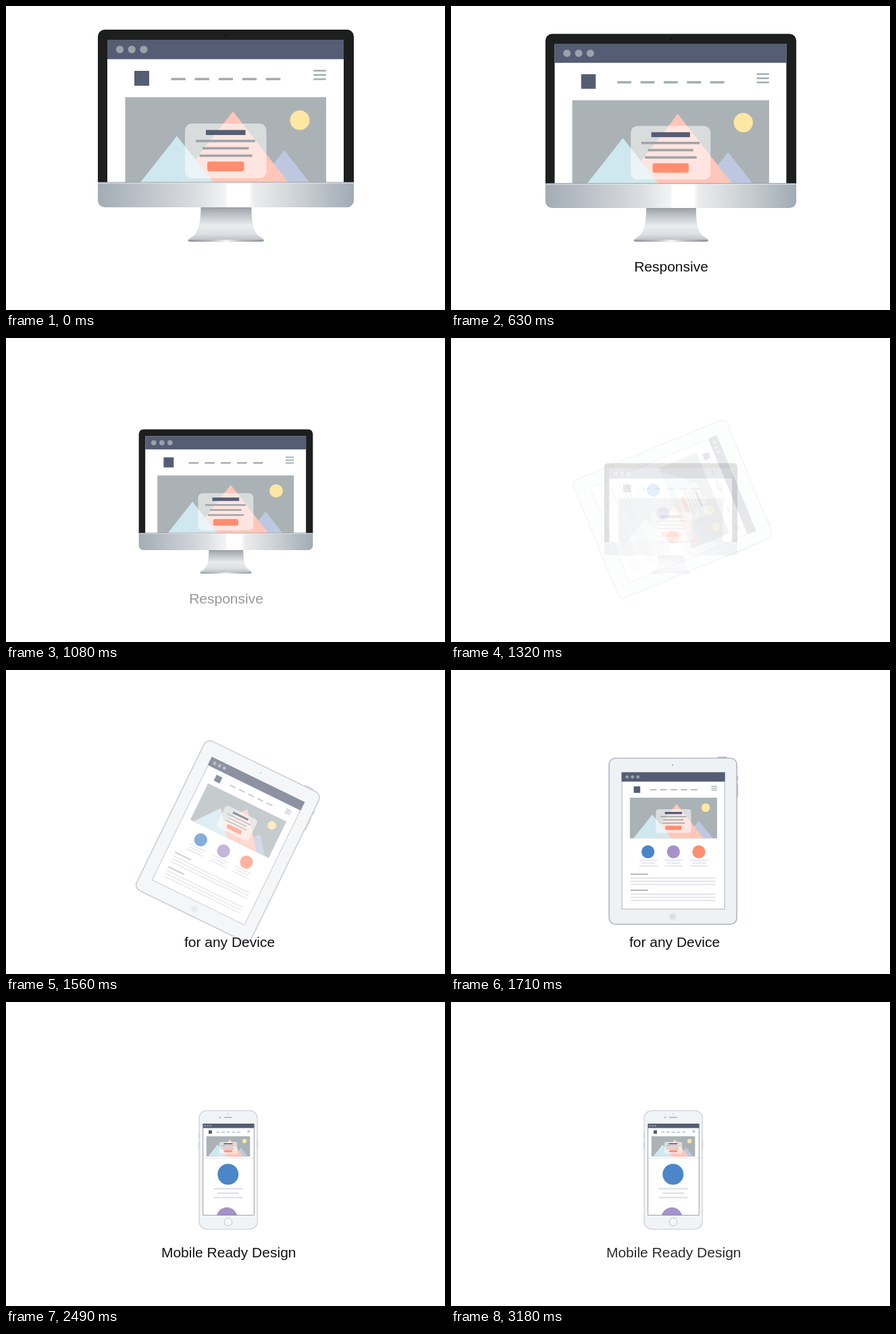
These frames come from a looping animation (650x450 px, 9.18 s). An HTML page:

```html
<!DOCTYPE html>
<html lang="en">
<head>
<meta charset="utf-8">
<title>Responsive design</title>
<style>
  html, body { margin: 0; width: 100%; height: 100%; overflow: hidden; background: #fff; }
  svg { display: block; }
  text { font: 21px "Liberation Sans", Arial, sans-serif; fill: #111; text-anchor: middle; }
</style>
</head>
<body>
<svg id="stage" width="650" height="450" viewBox="0 0 650 450"></svg>
<script>
const STEP = 30, LOOP = 9180;
const NAVY = '#555d75', GREY = '#a3abb0', BLUE = '#4a86c8', PURPLE = '#a592c8', CORAL = '#ff8d70', PALE = '#dfe0e8';

const rect = (x, y, w, h, fill, r = 0, more = '') =>
  `<rect x="${x}" y="${y}" width="${w}" height="${h}" rx="${r}" fill="${fill}" ${more}/>`;
const circle = (x, y, r, fill, more = '') =>
  `<circle cx="${x}" cy="${y}" r="${r}" fill="${fill}" ${more}/>`;
const poly = (points, fill, more = '') => `<polygon points="${points}" fill="${fill}" ${more}/>`;
const repeat = (n, draw) => Array.from({ length: n }, (_, i) => draw(i)).join('');
const bars = (n, x, y, w, h, dx, dy, fill = GREY) =>
  repeat(n, i => rect(x + i * dx, y + i * dy, w, h, fill));
const dots = (x, y, gap, r) => repeat(3, i => circle(x + i * gap, y, r, '#9ba2a8'));
// A nested svg crops its content to the given box.
const crop = (x, y, w, h, box, content) =>
  `<svg x="${x}" y="${y}" width="${w}" height="${h}" viewBox="${box}" preserveAspectRatio="none">${content}</svg>`;
const stops = list => list.map(([at, color]) => `<stop offset="${at}" stop-color="${color}"/>`).join('');
const caption = (cx, y, wide, narrow, gap, h) =>
  repeat(3, i => {
    const w = i === 1 ? narrow : wide;
    return rect(cx - w / 2, y + i * gap, w, h, PALE);
  });

const scenery =
  rect(176, 135, 298, 140, '#abb2b5') +
  circle(435, 169, 14.5, '#fde7a2') +
  poly('412,213.5 364,275 460,275', '#bdc8e0') +
  poly('336,156 243,275 429,275', '#ffc6b9') +
  poly('253,192.5 188,275 318,275', '#d1eaf2', 'fill-opacity=".95"') +
  rect(265, 174, 120.5, 81, '#fff', 10, 'fill-opacity=".55"') +
  rect(296, 183.5, 58.5, 7.5, NAVY) +
  rect(281, 198, 88, 3.6, '#a0a3a8') +
  rect(291, 208.8, 68.5, 3.6, '#a0a3a8') +
  rect(286.5, 219.8, 78, 3.6, '#a0a3a8') +
  rect(298, 230.3, 54.5, 14.4, CORAL, 3);
const hero = (x, y, w, h) => crop(x, y, w, h, `176.5 135 297.5 ${297.5 * h / w}`, scenery);

const monitor =
  `<path d="M136 262V45a10 10 0 0 1 10-10H505a10 10 0 0 1 10 10V262Z" fill="#1d1e1e"/>` +
  circle(326, 43, 1.5, '#111') +
  rect(150, 50, 350, 211, '#fff') +
  rect(150, 50, 350, 28.7, NAVY) +
  dots(168.5, 64.3, 17.7, 5.6) +
  rect(190, 96, 22, 22, NAVY) +
  bars(5, 244.5, 106.4, 21.3, 3.5, 35.1, 0) +
  bars(3, 455.3, 94.5, 18.5, 2.5, 0, 6.3) +
  hero(176.5, 135, 297.5, 126) +
  `<path d="M288.5 297H363.5C364 320 365 334 376 341.5Q382 344.5 382 347.5H269.5Q270 344.5 276 341.5C286 334 288 320 288.5 297Z" fill="url(#stand)"/>` +
  `<path d="M269.3 346H382.2Q382 349 378 349H273.5Q269.5 349 269.3 346Z" fill="url(#foot)"/>` +
  `<path d="M136 261H515V288a10 10 0 0 1-10 10H146a10 10 0 0 1-10-10Z" fill="url(#chin)"/>` +
  rect(136, 260.6, 379, 1, '#8d9398') +
  rect(136, 261.6, 379, 1, '#e9ecee');

const tablet =
  rect(385, 146.3, 12, 3, '#b9bec6', 1) +
  rect(408.5, 170, 2.6, 7, '#b9bec6', 1) +
  rect(408.5, 180, 2.6, 18, '#b9bec6', 1) +
  rect(247.8, 148.3, 161.6, 210.2, '#eff2f5', 8, 'stroke="#b3b8c1" stroke-width="1.4"') +
  circle(328, 157.2, .9, '#a0a5ab') +
  rect(264, 166.5, 130, 172.8, '#fff', 0, 'stroke="#b0b4b9" stroke-width=".9"') +
  rect(263.6, 166.2, 130.8, 11.8, NAVY) +
  dots(270.6, 172.1, 6.8, 2.1) +
  rect(279, 184, 8.2, 8.2, NAVY) +
  bars(5, 299.8, 187.6, 8, 1.4, 12.9, 0) +
  bars(3, 377.2, 183.4, 7.2, 1.1, 0, 2.4) +
  hero(274, 198.3, 110.5, 51.5) +
  [BLUE, PURPLE, CORAL].map((color, i) =>
    circle(297 + i * 32.2, 266.8, 8.2, color) + caption(297.5 + i * 32.2, 276.8, 23, 17, 3.6, 1.3)).join('') +
  [294.3, 314.6].map(y =>
    rect(275, y, 22, 1.6, '#b0b3b9') + bars(3, 275, y + 5, 107.5, 1.6, 0, 4, '#e1e3e9')).join('') +
  circle(328.3, 348.6, 4.6, '#e2e5e8') +
  rect(326.6, 346.9, 3.4, 3.4, 'none', .8, 'stroke="#ccd0d5" stroke-width=".6"');

const phoneScreen =
  rect(291, 180, 77, 137, '#fff') +
  rect(291, 180, 77, 6.6, NAVY) +
  dots(294.8, 183.3, 4, 1.2) +
  rect(300, 190, 5, 5, NAVY) +
  bars(5, 311.3, 192.1, 5, 1.1, 7.7, 0) +
  bars(3, 357.5, 189.6, 4, .8, 0, 1.5) +
  hero(296.6, 198.4, 65, 30.3) +
  rect(291, 230.6, 77, .9, '#e3e4ea') +
  circle(328.8, 255, 15.5, BLUE) +
  caption(329, 275.3, 43, 32, 6.5, 2.3) +
  circle(327, 319.5, 15.5, PURPLE);
const phone =
  rect(284.8, 194, 2, 8, '#c9ccd4', .8) +
  rect(284.8, 207, 2, 11, '#c9ccd4', .8) +
  rect(371.2, 205, 2, 13, '#c9ccd4', .8) +
  rect(286, 160.8, 86.2, 175.4, '#f1f4f6', 11, 'stroke="#c8cbd3" stroke-width="1.1"') +
  circle(328.8, 165.6, .8, '#b0b3ba') +
  circle(317.2, 170.8, 1.1, '#9a9da5') +
  rect(323, 170.2, 12, 1.3, '#a0a3aa', .6) +
  crop(291.5, 180, 76, 136, '291.5 180 76 136', phoneScreen) +
  `<path d="M291.6 180V315.6H367.3V180" fill="none" stroke="#85888f" stroke-width=".8"/>` +
  circle(329, 325.6, 5.8, '#f4f6f8', 'stroke="#bfc2ca" stroke-width="1"');

const stage = document.getElementById('stage');
stage.innerHTML = `<defs>
  <linearGradient id="chin">${stops([[0, '#a3acb4'], [.12, '#b4bbc2'], [.38, '#dadde0'], [.5, '#f3f4f5'],
    [.505, '#fff'], [.59, '#fff'], [.61, '#ececed'], [.75, '#d3d7da'], [1, '#a1abb4']])}</linearGradient>
  <linearGradient id="stand" x2="0" y2="1">${stops([[0, '#969ba1'], [.2, '#b9bdc2'], [.55, '#e9ebed'],
    [.8, '#dde0e3'], [1, '#b9bec3']])}</linearGradient>
  <linearGradient id="foot">${stops([[0, '#8f979e'], [.3, '#b4babf'], [.5, '#f2f3f4'], [.7, '#b4babf'], [1, '#8f979e']])}</linearGradient>
</defs>
<g id="monitor">${monitor}</g>
<g id="tablet">${tablet}</g>
<g id="phone">${phone}</g>
<text id="first" x="326" y="393">Responsive</text>
<text id="second" x="331" y="410">for any Device</text>
<text id="third" x="329.7" y="378">Mobile Ready Design</text>`;

const ramp = (k, from, to) => Math.min(1, Math.max(0, (k - from) / (to - from)));
const pulse = (k, a, b, c, d) => ramp(k, a, b) * (1 - ramp(k, c, d));

function show(id, opacity, x = 0, y = 0, scale = 1, angle = 0) {
  const node = document.getElementById(id);
  node.setAttribute('opacity', opacity);
  node.setAttribute('visibility', opacity > 0 ? 'visible' : 'hidden');
  if (scale !== 1 || angle !== 0)
    node.setAttribute('transform', `translate(${x} ${y}) rotate(${angle}) scale(${scale}) translate(${-x} ${-y})`);
  else node.removeAttribute('transform');
}

function render(time) {
  const k = Math.floor((time % LOOP) / STEP);
  show('monitor', 1 - ramp(k, 38, 45), 325.5, 348, 1 - .5 * ramp(k, 20, 45));
  show('tablet', pulse(k, 42, 57, 76, 83), 328.5, 253,
    1.17 - .442 * ramp(k, 70, 83), 78 * (1 - ramp(k, 42, 57)));
  show('phone', ramp(k, 70, 74), 329, 211.6, .338 + .662 * ramp(k, 70, 83));
  show('first', pulse(k, 0, 7, 32, 39));
  show('second', pulse(k, 44, 51, 71, 79));
  show('third', ramp(k, 76, 83) * (k < 106 ? 1 : .89));
}

const start = performance.now();
function tick() {
  render(performance.now() - start);
  requestAnimationFrame(tick);
}
render(0);
requestAnimationFrame(tick);
</script>
</body>
</html>
```
